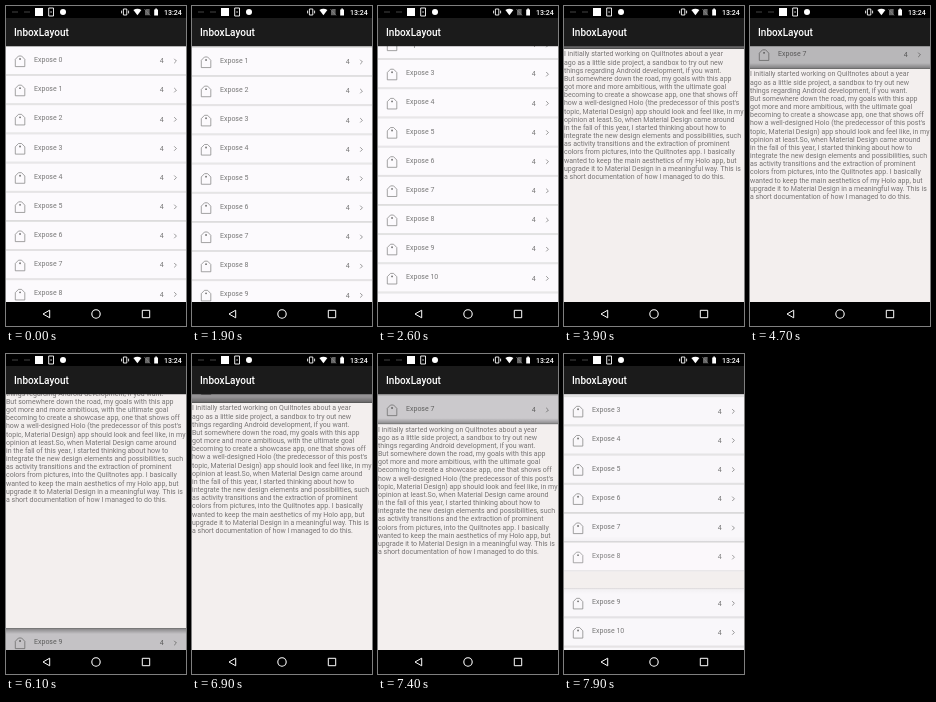
These frames come from a looping animation (180x320 px, 8 s). An HTML page with a canvas:

```html
<!DOCTYPE html>
<html lang="en">
<head>
<meta charset="utf-8">
<style>
html, body { margin: 0; width: 100%; height: 100%; overflow: hidden; background: #000; }
canvas { display: block; width: 180px; height: 320px; }
</style>
</head>
<body>
<canvas id="stage"></canvas>
<script>
const W = 180, H = 320, TOP = 40, BOTTOM = 296;
const LOOP = 8000, STEP = 100;
const ROW = 29.17, OPENED = 8;

const ARTICLE = [
  "I initially started working on Quiltnotes about a year",
  "ago as a little side project, a sandbox to try out new",
  "things regarding Android development, if you want.",
  "But somewhere down the road, my goals with this app",
  "got more and more ambitious, with the ultimate goal",
  "becoming to create a showcase app, one that shows off",
  "how a well-designed Holo (the predecessor of this post's",
  "topic, Material Design) app should look and feel like, in my",
  "opinion at least.So, when Material Design came around",
  "in the fall of this year, I started thinking about how to",
  "integrate the new design elements and possibilities, such",
  "as activity transitions and the extraction of prominent",
  "colors from pictures, into the Quiltnotes app. I basically",
  "wanted to keep the main aesthetics of my Holo app, but",
  "upgrade it to Material Design in a meaningful way. This is",
  "a short documentation of how I managed to do this."
];

// Motion tracks: [time in ms, value]
const SCROLL = [[1300, 0], [1600, 11], [1900, 28.2], [2300, 60], [2600, 74.3]];
const OPEN = [[3000, 0], [3100, .36], [3200, .64], [3300, .84], [3400, .96], [3500, 1],
  [7700, 1], [7800, .42], [7900, .09]];
const PULL = [[3800, 0], [3900, 3], [4300, 15], [4700, 23], [4800, 25], [4900, 14], [5000, 6],
  [5200, 0], [5400, 0], [5500, -3], [5800, -14], [6100, -22], [6300, -25], [6400, -14],
  [6500, -5], [6600, 0], [6800, 0], [6900, 9], [7200, 25], [7700, 38]];
const GLOW = [[400, 0], [600, 1], [800, 0]];

const canvas = document.getElementById("stage");
const ctx = canvas.getContext("2d");
const ratio = window.devicePixelRatio || 1;
canvas.width = W * ratio;
canvas.height = H * ratio;

const mix = (a, b, k) => a + (b - a) * k;

function track(keys, t) {
  if (t <= keys[0][0]) return keys[0][1];
  const i = keys.findIndex(key => key[0] >= t);
  if (i < 0) return keys[keys.length - 1][1];
  const [t0, v0] = keys[i - 1], [t1, v1] = keys[i];
  return mix(v0, v1, (t - t0) / (t1 - t0));
}

function rect(x, y, w, h, color) {
  ctx.fillStyle = color;
  ctx.fillRect(x, y, w, h);
}

function text(string, x, y, color, font = "7px") {
  ctx.font = `${font} Roboto, sans-serif`;
  ctx.fillStyle = color;
  ctx.fillText(string, x, y);
}

function stroke(path, color, width) {
  ctx.strokeStyle = color;
  ctx.lineWidth = width;
  ctx.stroke(new Path2D(path));
}

function fill(path, color) {
  ctx.fillStyle = color;
  ctx.fill(new Path2D(path));
}

function clipped(y, height, draw) {
  ctx.save();
  ctx.beginPath();
  ctx.rect(0, y, W, height);
  ctx.clip();
  draw();
  ctx.restore();
}

function drawRow(n, y) {
  if (y > BOTTOM || y + ROW < TOP) return;
  ctx.save();
  ctx.translate(0, y);
  rect(0, 0, W, ROW, "#fcfafd");
  rect(0, 0, W, .8, "#dddcdd");
  rect(0, ROW - 1, W, 1, "#dddcdd");
  stroke("M9.3 13.3 L12.5 10 H15.6 L18.8 13.3 V20.6 H9.3 Z", "#858585", .75);
  fill("M13.1 13 a.95 .95 0 1 0 1.9 0 a.95 .95 0 1 0 -1.9 0", "#777");
  text("Expose " + n, 28, 16, "#787878");
  text("4", 153.8, 17.2, "#747474");
  stroke("M168.2 12.8 L170.4 15 L168.2 17.2", "#777", .75);
  ctx.restore();
}

function shadow(y, length, alpha) {
  const gradient = ctx.createLinearGradient(0, y, 0, y + length);
  gradient.addColorStop(0, `rgba(0,0,0,${alpha})`);
  gradient.addColorStop(1, "rgba(0,0,0,0)");
  rect(0, Math.min(y, y + length), W, Math.abs(length), gradient);
}

function drawSheet(top, bottom, open) {
  clipped(top, bottom - top, () => {
    rect(0, top, W, bottom - top, "#f3efee");
    ctx.globalAlpha = Math.max(0, open * 2 - 1);
    ARTICLE.forEach((line, i) => text(line, 0, top + 7.4 + i * 8.17, "#777474"));
    ctx.globalAlpha = 1 - open;
    drawRow(OPENED, top);
  });
}

function drawContent(t) {
  const scroll = track(SCROLL, t), open = track(OPEN, t), pull = track(PULL, t);
  const first = TOP - scroll;
  rect(0, TOP, W, BOTTOM - TOP, "#f3efee");

  if (!open) {
    for (let n = 0; n < 14; n++) drawRow(n, first + n * ROW);
    const glow = track(GLOW, t);
    if (glow) fill("M0 40 H180 V52 Q90 82 0 52 Z", `rgba(0,0,0,${.05 * glow})`);
    return;
  }

  const rowTop = first + OPENED * ROW;
  const top = mix(rowTop, TOP + pull, open);
  const bottom = mix(rowTop + ROW, BOTTOM + Math.min(0, pull), open);
  for (let n = 0; n < OPENED; n++) drawRow(n, top - (OPENED - n) * ROW);
  for (let n = OPENED + 1; n < 14; n++) drawRow(n, bottom + (n - OPENED - 1) * ROW);

  const dim = (pull < 0 ? .4 : .5) * (1 - Math.abs(pull) / 50) * open;
  rect(0, TOP, W, BOTTOM - TOP, `rgba(0,0,0,${dim})`);
  shadow(top, -6, .35 * open);
  shadow(bottom, 6, .35 * open);
  drawSheet(top, bottom, open);
}

function drawBars() {
  rect(0, 0, W, 12, "#000");
  rect(0, 12, W, TOP - 12, "#1b1b1b");
  rect(0, TOP, W, 1, "rgba(0,0,0,.2)");
  rect(0, BOTTOM, W, H - BOTTOM, "#000");
  text("InboxLayout", 8, 30, "#fff", "500 10px");

  rect(6, 5.6, 6, .8, "#555");
  rect(18, 5.6, 6, .8, "#555");
  rect(29, 2, 8, 8, "#fff");
  stroke("M42.7 2 h4.8 v8 h-4.8 z M44.3 6 h1.6", "#fff", .9);
  fill("M54 6 a3 3 0 1 0 6 0 a3 3 0 1 0 -6 0", "#fff");
  stroke("M117.4 3 h3.4 v6 h-3.4 z M115.6 4.6 v2.8 M122.6 4.6 v2.8", "#fff", .9);
  fill("M127.4 4 Q131.4 1.4 135.4 4 L131.4 9.2 Z", "#fff");
  fill("M139 4.4 L140.4 3 H143.6 V9.2 H139 Z", "#666");
  stroke("M138.4 3 L144 9.4", "#888", .7);
  fill("M148.2 3.4 h1.1 v-.8 h1.6 v.8 h1.1 v6 h-3.8 z", "#fff");
  text("13:24", 158, 8.7, "#fff", "500 7px");

  stroke("M43.7 304.2 V311.8 L37 308 Z", "#fff", 1);
  stroke("M85.8 308 a4.2 4.2 0 1 0 8.4 0 a4.2 4.2 0 1 0 -8.4 0", "#fff", 1.1);
  stroke("M136.3 304.3 h7.4 v7.4 h-7.4 z", "#fff", 1);
}

function frame() {
  const t = Math.floor((performance.now() % LOOP) / STEP) * STEP;
  ctx.setTransform(ratio, 0, 0, ratio, 0, 0);
  clipped(TOP, BOTTOM - TOP, () => drawContent(t));
  drawBars();
  requestAnimationFrame(frame);
}
frame();
</script>
</body>
</html>
```
